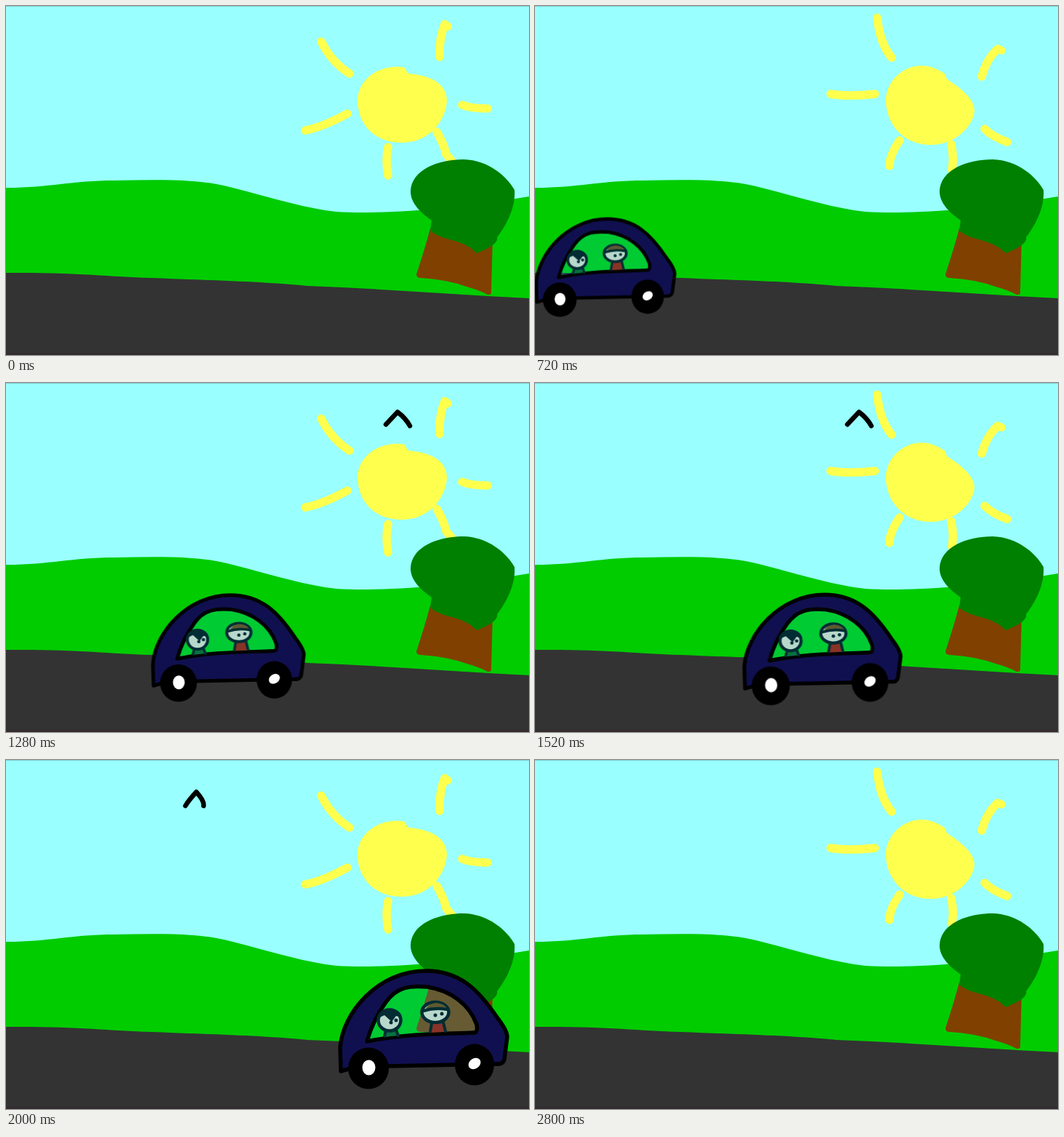
Recreate the animation shown at these times as an HTML page. Size 720 px wide and 480 px high, loop 2.88 s.

```html
<!DOCTYPE html>
<html lang="en">
<head>
<meta charset="utf-8">
<title>Sunday drive</title>
<style>
  html, body { margin: 0; width: 100%; height: 100%; overflow: hidden; background: #9ff; }
  svg { display: block; width: 720px; height: 480px; }
  svg * { stroke-linecap: round; stroke-linejoin: round; }

  .sun { fill: #ffff4d; }
  .rays { fill: none; stroke: #ffff4d; stroke-width: 11.5; }
  .ink { fill: none; stroke: #000; stroke-width: 5.5; }
  .face { fill: #b8d8cc; stroke: #022c33; stroke-width: 4.5; }
  .hair { fill: #022c33; }
  .thin { fill: none; stroke: #022c33; stroke-width: 4; }
  .bird path { fill: none; stroke: #000; stroke-width: 6.5; visibility: hidden; }

  /* Everything moves on an 80 ms tick, 36 ticks per loop. */
  .car { animation: drive 2880ms steps(36) -1ms infinite; }
  .bird { animation: fly 2880ms steps(36) -1ms infinite; }
  .bird path { animation: pose 2880ms step-end infinite; animation-delay: calc(799ms + var(--i) * 480ms); }
  .body { animation: lift 2880ms step-end -1ms infinite; }
  .day1, .day2 { animation: day1 2880ms step-end -1ms infinite; }
  .day2 { animation-name: day2; }

  @keyframes drive {
    from { transform: translate(-257.5px, 293px) scale(.7325); }
    to { transform: translate(772.8px, 285.8px) scale(1.1177); }
  }
  @keyframes fly {
    from { transform: translate(1035px, 0); }
    to { transform: translate(-81px, 0); }
  }
  @keyframes pose {
    0% { visibility: visible; }
    16.667%, 100% { visibility: hidden; }
  }
  @keyframes lift {
    77.77%, 100% { transform: translate(0, -4px); }
  }
  /* The two suns swap every 500 ms. */
  @keyframes day1 {
    0%, 36.11%, 69.44% { visibility: visible; }
    19.44%, 52.77%, 88.88%, 100% { visibility: hidden; }
  }
  @keyframes day2 {
    0%, 36.11%, 69.44% { visibility: hidden; }
    19.44%, 52.77%, 88.88%, 100% { visibility: visible; }
  }
</style>
</head>
<body>
<svg viewBox="0 0 720 480">
  <defs>
    <path id="glass" d="M497 387Q505 358 523 333C538 312 556 310 580 312C612 317 638 336 648 364Q650 375 644 375C600 377 550 376 497 387Z"/>
  </defs>

  <rect width="720" height="480" fill="#9ff"/>
  <rect width="720" height="1" fill="#80d0d0"/>

  <g class="day1">
    <path class="sun" d="M546 84C552 85 550 91 555 93C590 96 607 110 607 130C606 155 585 188 545 188C505 188 484 160 484 130C484 100 515 80 546 84Z"/>
    <path class="rays" d="M434 49Q448 77 473 93M412 171Q435 167 470 148M526 194Q522 212 526 233M593 173Q603 190 606 204L613 212M628 136Q640 141 663 141M597 70Q596 45 604 25L608 28"/>
  </g>
  <g class="day2">
    <path class="sun" d="M562 92C567 94 564 98 569 102C590 115 605 130 605 143C605 163 580 191 545 191C505 191 483 160 483 130C483 95 525 66 562 92Z"/>
    <path class="rays" d="M471 16Q475 52 491 71M407 121Q430 125 468 121M502 185Q488 205 488 220M573 190Q577 208 574 225M619 169Q630 180 650 187M615 97Q622 72 637 59L642 61"/>
  </g>

  <path fill="#0c0" d="M0 250C60 250 90 240 150 240C200 239 250 238 290 245C340 255 400 277 455 283C520 287 620 279 720 262V480H0Z"/>
  <path fill="#333" d="M0 367C90 366 140 372 200 374C300 378 350 379 415 385C520 389 620 397 720 402V480H0Z"/>
  <rect y="477" width="720" height="3" fill="#332b2f"/>

  <path fill="#804000" d="M584 306Q577 333 565 369Q565 374 571 374Q606 376 634 386Q652 391 663 397Q669 398 668 392L670 318Z"/>
  <path fill="#008000" d="M557 255C558 225 595 211 630 211C665 212 690 235 700 253C702 275 690 300 676 318Q679 328 648 340L640 333C620 320 600 322 584 309L586 295C572 285 557 272 557 255Z"/>

  <g class="bird">
    <path style="--i:0" d="M-20 46Q-7 42 0 34Q10 42 21 47"/>
    <path style="--i:1" d="M-16 57L0 40Q11 48 17 59"/>
    <path style="--i:2" d="M-13 63Q-9 56 2 44Q13 56 12 63"/>
    <path style="--i:3" d="M-20 48Q-9 42 1 49Q17 41 23 50"/>
  </g>

  <g class="car"><g transform="translate(-458 -288)">
    <g class="body">
      <mask id="hole">
        <rect x="440" y="270" width="270" height="170" fill="#fff"/>
        <use href="#glass"/>
      </mask>
      <path id="shell" mask="url(#hole)" fill="#101050" d="M461 428L460 396C463 348 512 290 578 290C624 290 650 315 676 354Q690 372 690 381L686 412Q684 419 676 418L527 421L475 424Z"/>
      <use href="#glass" fill="#00c8ff" fill-opacity=".2"/>
      <path class="ink" d="M461 428L460 396C463 348 512 290 578 290C624 290 650 315 676 354Q690 372 690 381L686 412Q684 419 676 418L527 421L475 424Z"/>
      <use class="ink" href="#glass"/>

      <path fill="#087040" d="M523 371L521 381L540 379L537 371Z"/>
      <path class="thin" d="M523 372L521 380M537 371L540 379"/>
      <ellipse class="face" cx="528" cy="358" rx="15.5" ry="14.5"/>
      <path class="hair" d="M512 355Q514 342 529 342Q543 343 545 354L537 352L531 360L521 351Z"/>
      <circle class="hair" cx="530" cy="361" r="2.5"/>
      <circle class="hair" cx="537" cy="358" r="2.5"/>

      <path fill="#883328" d="M586 361L583 375L605 374L602 361Z"/>
      <path class="thin" d="M586 362L584 374M602 361L605 373"/>
      <ellipse class="face" cx="591" cy="347" rx="18.5" ry="14"/>
      <path fill="#5c5a30" d="M577 343Q581 335 592 334Q604 335 607 342Z"/>
      <path class="thin" d="M575 345Q590 340 607 343"/>
      <circle class="hair" cx="591" cy="351" r="2.5"/>
      <circle class="hair" cx="600" cy="349" r="2.5"/>
    </g>
    <ellipse cx="499" cy="424" rx="28" ry="28.5"/>
    <ellipse cx="499.5" cy="423" rx="9" ry="10.5" fill="#fff"/>
    <ellipse cx="645" cy="419" rx="27" ry="28.5"/>
    <ellipse cx="645" cy="417.5" rx="9" ry="7" fill="#fff" transform="rotate(-35 645 417.5)"/>
  </g></g>
</svg>
</body>
</html>
```
